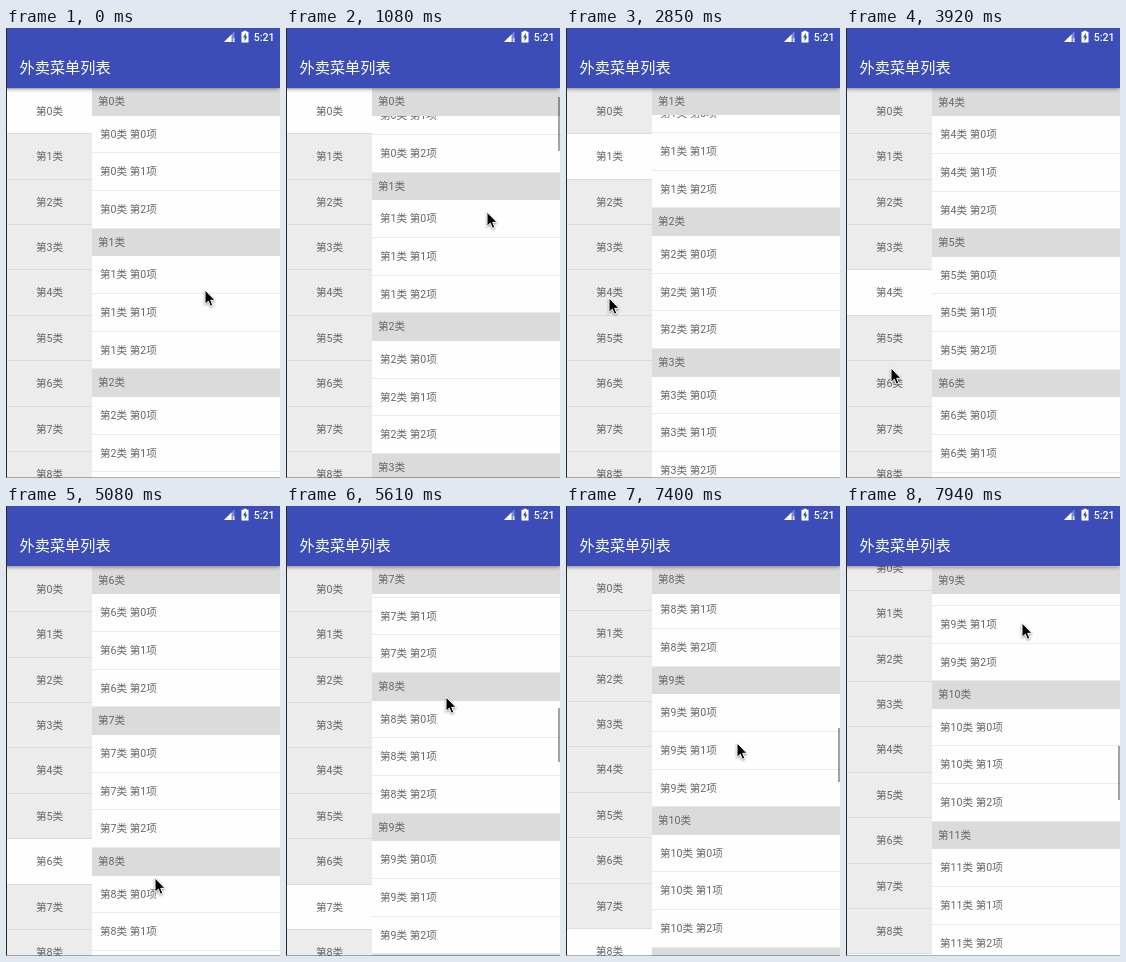
These frames come from a looping animation (274 by 450 pixels, 8 s). An HTML page:

```html
<!DOCTYPE html>
<html lang="zh-CN">
<head>
<meta charset="utf-8">
<title>外卖菜单列表</title>
<style>
html, body { margin: 0; width: 100%; height: 100%; overflow: hidden; }
body { background: #fefefe; color: #666; font: 10.6px Roboto, "Noto Sans CJK SC", "Noto Sans CJK", sans-serif; }
#stage { position: relative; width: 274px; height: 450px; overflow: hidden; }
#stage > * { position: absolute; }
#bar {
  left: 0; top: 0; width: 274px; height: 60px; color: #fff; background: #3d4db7;
  box-shadow: 0 1px 4px rgba(0, 0, 0, .45); z-index: 2;
}
#bar > * { position: absolute; }
#title { left: 13.5px; top: 29px; font-size: 15.2px; line-height: 23px; white-space: nowrap; }
#clock { right: 5.5px; top: 2.5px; font-weight: 500; line-height: 14px; }
#icons { left: 216px; top: 2px; }
.list { top: 60.3px; height: 389.7px; overflow: hidden; white-space: nowrap; }
#cats { left: 1px; width: 85px; box-sizing: border-box; padding-top: .5px; background: #ececec; text-align: center; }
#cats div { height: 45.4px; line-height: 45.4px; box-sizing: border-box; border-bottom: 1px solid #dbdbdb; }
#cats .on { background: #fefefe; }
#items { left: 86px; width: 188px; background: #fefefe; isolation: isolate; }
#items section { height: 140.6px; }
#items h2 {
  position: sticky; top: 0; z-index: 1; margin: 0; padding-left: 6px;
  height: 27.5px; font: inherit; line-height: 27.5px; background: #dbdbdb;
}
#items p {
  margin: 0; padding-left: 8px; height: 37.7px; line-height: 37.7px;
  box-sizing: border-box; border-bottom: 1px solid #eaeaea;
}
#thumb { left: 272px; top: 0; width: 2px; height: 54px; background: rgba(0, 0, 0, .36); }
#edge { inset: 0; border: solid #2a2a2a; border-width: 0 0 1px 1px; border-bottom-color: rgba(0, 0, 0, .3); z-index: 3; }
#cursor { left: 0; top: 0; z-index: 4; overflow: visible; filter: drop-shadow(0 1px 1px rgba(0, 0, 0, .4)); }
</style>
</head>
<body>
<div id="stage">
  <div id="cats" class="list"></div>
  <div id="items" class="list"></div>
  <div id="thumb"></div>
  <div id="bar">
    <svg id="icons" width="30" height="14">
      <path d="M2 12 12.500 1.500V12Z" fill="#fff" opacity=".35"/>
      <path d="M2 12 9.500 4.500V12ZM11 8.500h1.500v1.200H11ZM11 10.600h1.500V12H11Z" fill="#fff"/>
      <path d="M19.500 1.800h2V.800h3v1h2V12.500h-7Z" fill="#fff"/>
      <path d="M23.800 3 20.900 7.500h1.800v3.700l2.700-4.700h-1.600Z" fill="#3d4db7"/>
    </svg>
    <div id="clock">5:21</div>
    <div id="title">外卖菜单列表</div>
  </div>
  <div id="edge"></div>
  <svg id="cursor" width="13" height="20">
    <path d="M1 1V15.300L4.300 12.200 6.400 17.200 8.800 16.200 6.700 11.300H11Z" fill="#000" stroke="#fff" stroke-linejoin="round"/>
  </svg>
</div>
<script>
const LOOP = 8000, TICK = 89, FIRST = 810, SECTION = 140.6, COUNT = 20;
const $ = id => document.getElementById(id);
const range = n => [...Array(n).keys()];
const clamp = v => Math.min(1, Math.max(0, v));
const linear = f => f;
const easeOut = f => 1 - (1 - f) ** 2;
const smooth = f => f * f * (3 - 2 * f);

$('cats').innerHTML = range(COUNT).map(i => `<div>第${i}类</div>`).join('');
$('items').innerHTML = range(COUNT).map(i =>
  `<section><h2>第${i}类</h2>${range(3).map(j => `<p>第${i}类 第${j}项</p>`).join('')}</section>`).join('');
const cats = [...$('cats').children];

// Pointer moves; a move may start with a click on a category or drag the items.
// slop is the share of a drag that passes before the list follows.
const moves = [
  { from: 721, to: 2170, x: 202, y: 79.5, ease: easeOut, drag: 161, slop: .12 },
  { from: 2170, to: 2501, x: 74, y: 295 },
  { from: 2501, to: 2857, x: 42, y: 269 },
  { from: 3302, to: 4010, x: 44, y: 349, click: 4 },
  { from: 4372, to: 4720, x: 148, y: 371, click: 6 },
  { from: 5082, to: 6150, x: 162, y: 130, ease: easeOut, drag: 245, slop: .12 },
  { from: 6240, to: 6685, x: 165, y: 344 },
  { from: 6915, to: 7934, x: 175, y: 115, drag: 204, slop: .15 }
];

function stateAt(t) {
  let x = 198, y = 261, scroll = 0, thumb = 0;
  for (const m of moves) {
    if (t < m.from) break;
    const e = (m.ease || linear)(clamp((t - m.from) / (m.to - m.from)));
    x += (m.x - x) * e;
    y += (m.y - y) * e;
    if (m.click) scroll = m.click * SECTION;
    if (m.drag && e > m.slop) {
      scroll += m.drag * (e - m.slop) / (1 - m.slop);
      thumb = clamp(1 - (t - m.to - 100) / 250);
    } else if (t > m.to + 350) thumb = 0;
    else if (!m.drag) thumb = clamp(Math.min(thumb, 1));
  }
  return { x, y, scroll, thumb };
}

function draw(now) {
  // The screen refreshes in coarse ticks.
  const t = FIRST + Math.floor((now % LOOP - FIRST + 8) / TICK) * TICK;
  const { x, y, scroll, thumb } = stateAt(t);
  const active = Math.floor(scroll / SECTION + .01);
  $('items').scrollTop = scroll;
  $('cats').scrollTop = 21.3 * smooth(clamp((t - 7350) / 300));
  cats.forEach((c, i) => c.classList.toggle('on', i === active));
  $('thumb').style.transform = `translateY(${Math.round(60.8 + scroll * .1385)}px)`;
  $('thumb').style.opacity = thumb;
  $('cursor').style.transform = `translate(${Math.round(x)}px, ${Math.round(y)}px)`;
}

const start = performance.now();
function tick() {
  draw(performance.now() - start);
  requestAnimationFrame(tick);
}
tick();
</script>
</body>
</html>
```
